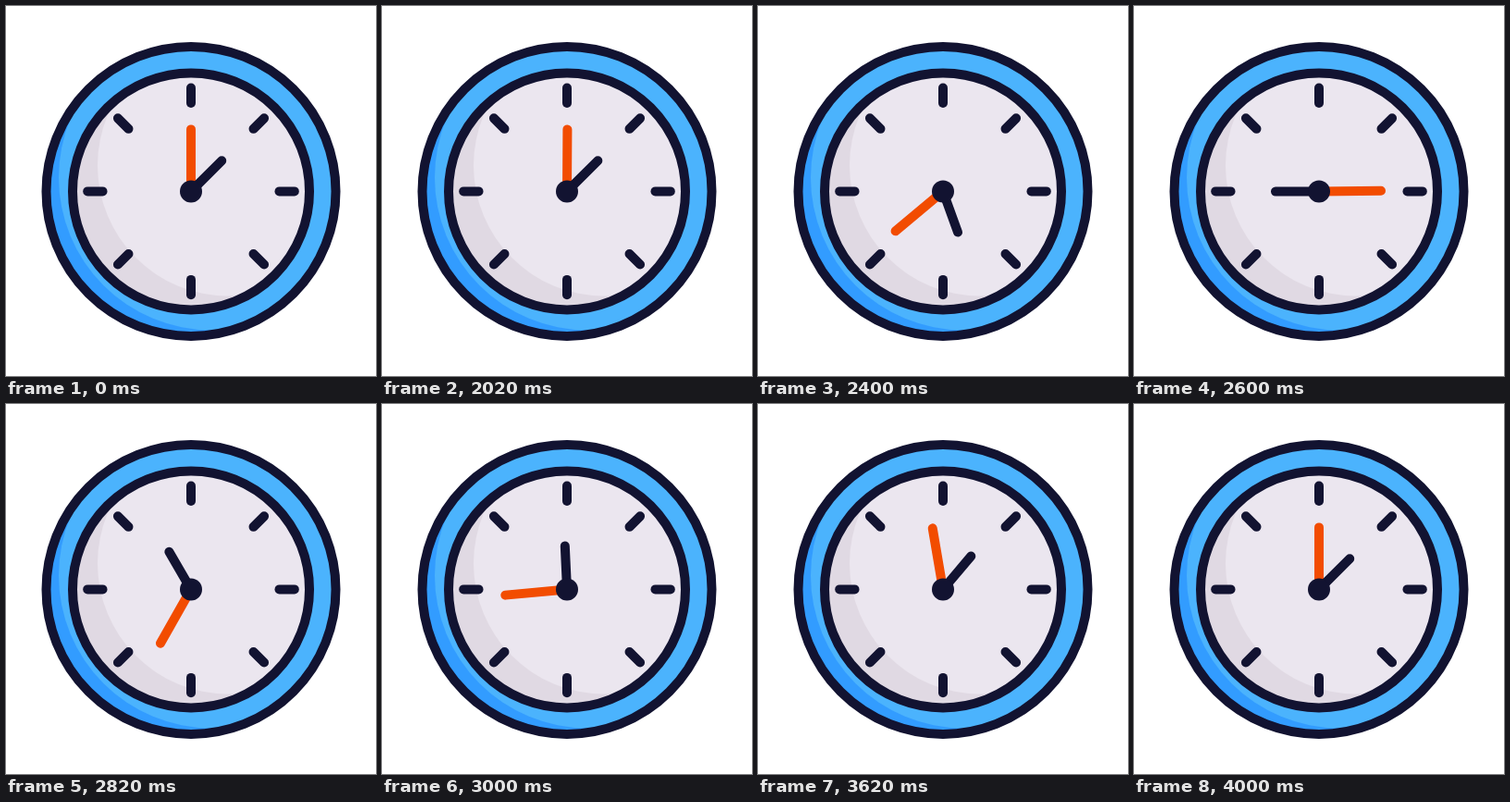
Write an HTML page that moves like this. It is 400x400 px and loops after 4020 ms.

```html
<!DOCTYPE html>
<html lang="en">
<head>
<meta charset="utf-8">
<title>Clock</title>
<style>
  html, body { margin: 0; height: 100%; overflow: hidden; background: #fff; }
  svg { display: block; width: 100vw; height: 100vh; }
</style>
</head>
<body>
<svg viewBox="0 0 400 400">
  <defs>
    <clipPath id="rim"><circle r="156.5"/></clipPath>
    <clipPath id="face"><circle r="128"/></clipPath>
  </defs>
  <g transform="translate(200 200.4)" fill="none" stroke-width="10" stroke-linecap="round">
    <circle r="156.5" fill="#329cff"/>
    <circle cx="22" cy="-15" r="165" fill="#4bb3fd" clip-path="url(#rim)"/>
    <circle r="156.5" stroke="#121331"/>
    <circle r="128" fill="#e0d9e3"/>
    <circle cx="40" cy="-28" r="141" fill="#ebe6ef" clip-path="url(#face)"/>
    <circle r="128" stroke="#121331"/>
    <g id="ticks" stroke="#121331"></g>
    <path id="minute" d="M0 0V-67" stroke="#f24c00"/>
    <path id="hour" d="M0 0V-47" stroke="#121331"/>
    <circle r="12" fill="#121331"/>
  </g>
</svg>
<script>
const LOOP = 4020, START = 2000, SPIN = 2000, STEP = 25;
const $ = id => document.getElementById(id);

$('ticks').innerHTML = Array.from({ length: 8 }, (_, i) =>
  `<path d="M0-95.5V-111.8" transform="rotate(${i * 45})"/>`).join('');

// cubic-bezier(.333, 0, 0, 1), solved by bisection
function ease(x) {
  if (x <= 0 || x >= 1) return x <= 0 ? 0 : 1;
  let lo = 0, hi = 1;
  for (let i = 0; i < 30; i++) {
    const s = (lo + hi) / 2;
    if ((1 - s) ** 2 * s + s ** 3 < x) lo = s; else hi = s;
  }
  return lo * lo * (3 - 2 * lo);
}

const turn = (id, deg) => $(id).setAttribute('transform', `rotate(${deg})`);

const origin = performance.now();
function draw() {
  const t = (performance.now() - origin) % LOOP;
  // 25 ms steps, shown on a 10 ms clock
  const step = Math.ceil((Math.floor(t / 10) + 1) * 10 / STEP) - 1;
  const p = ease((step * STEP - START) / SPIN);
  turn('minute', 720 * p);
  turn('hour', 45 + 360 * p);
  requestAnimationFrame(draw);
}
draw();
</script>
</body>
</html>
```
